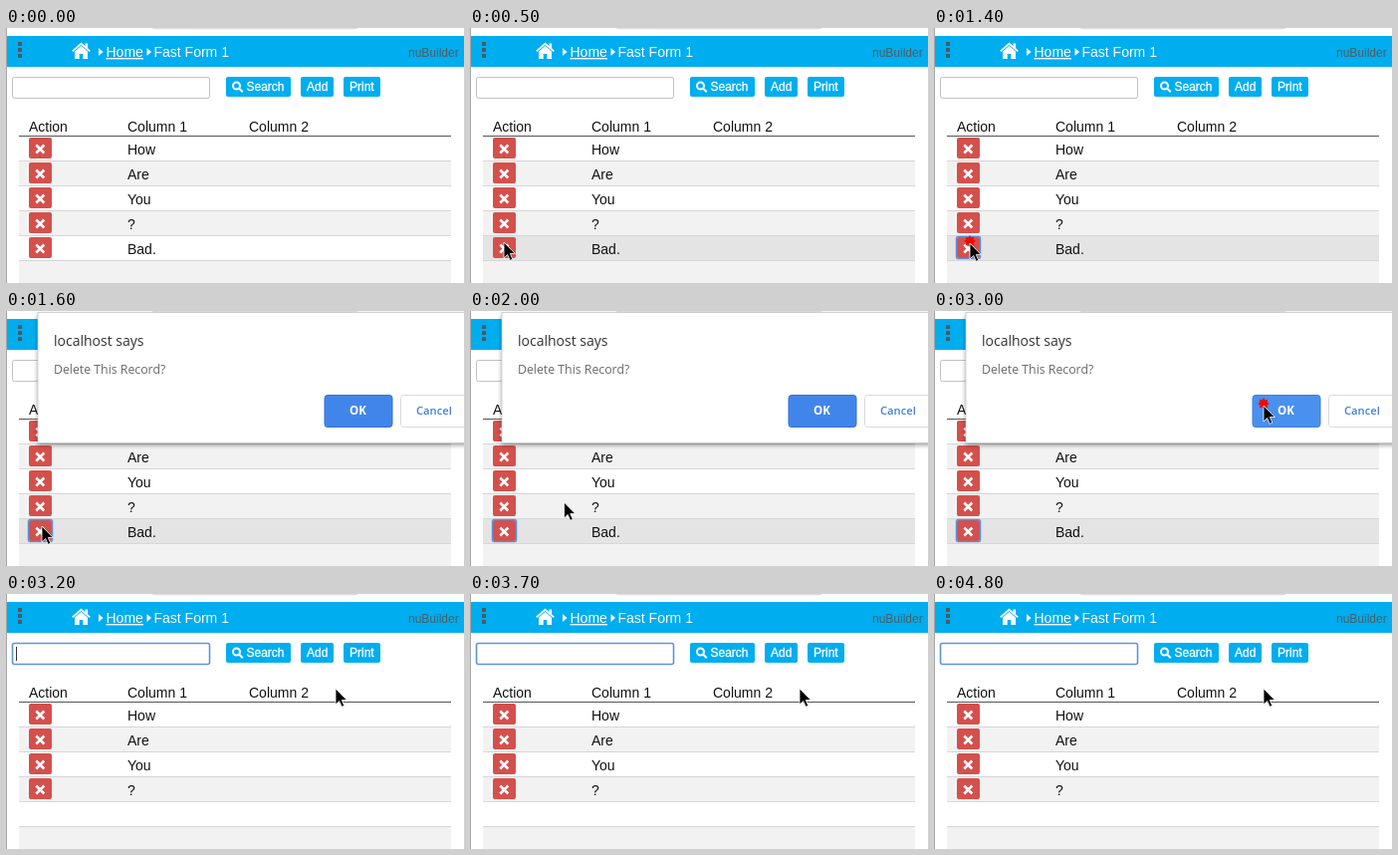
Animation of 460x256 px, one loop 5200 ms. Source, as an HTML page:

```html
<!DOCTYPE html>
<html lang="en">
<head>
<meta charset="utf-8">
<title>Deleting a record</title>
<style>
  html, body { margin: 0; width: 100%; height: 100%; overflow: hidden; background: #fff; }
  svg { display: block; width: 460px; height: 256px; }
  text { font: 14px "Liberation Sans", Arial, sans-serif; fill: #111; white-space: pre; }
  .white { fill: #fff; }
  .small { font-size: 12px; fill: #fff; stroke: #fff; stroke-width: .3px; }
  .brand { font-size: 12px; fill: #45606c; }
  .dialog text { font-family: "Open Sans", "Noto Sans", sans-serif; }
</style>
</head>
<body>
<svg viewBox="0 0 460 256">
  <defs>
    <filter id="shadow" x="-5%" y="-10%" width="110%" height="125%">
      <feDropShadow dx="0" dy="2" stdDeviation="2" flood-color="#000" flood-opacity=".38"/>
    </filter>
  </defs>
  <rect width="460" height="256" fill="#fff"/>
  <path d="M147 0Q149 .8 153 .8H347Q351 .8 353 0" fill="none" stroke="#d4d6d8"/>
  <rect width="1" height="256" fill="#a6a6a6"/>

  <rect x="1" y="8" width="459" height="31" fill="#00adef"/>
  <path d="M12 14h4v4h-4zM12 20h4v4h-4zM12 26h4v4h-4z" fill="#4a5a64"/>
  <g fill="#fff">
    <path d="M69 23.6 75.5 18 82 23.6V31H77.3V26H73.7V31H69Z"/>
    <path d="M66.7 23.4 75.5 15.8 84.3 23.4" fill="none" stroke="#fff" stroke-width="1.8"/>
    <path d="M79.5 15.5h2.6v5l-2.6-2.2z"/>
    <path d="M93 20l4.5 4-4.5 4zM141.500 20l4.500 4-4.500 4z"/>
  </g>
  <text class="white" x="100.500" y="29" text-decoration="underline">Home</text>
  <text class="white" x="148.500" y="29">Fast Form 1</text>
  <text class="brand" x="404" y="29">nuBuilder</text>

  <rect id="field" x="6.5" y="49.5" width="198" height="21" rx="2" fill="#fff"/>
  <path id="caret" d="M10.500 53V67" stroke="#333"/>
  <g fill="#00adef">
    <rect x="221" y="49" width="65" height="20" rx="2"/>
    <rect x="296" y="49" width="33" height="20" rx="2"/>
    <rect x="339" y="49" width="37" height="20" rx="2"/>
  </g>
  <g fill="none" stroke="#fff" stroke-width="2">
    <circle cx="231.500" cy="58" r="3.500"/><path d="M234 60.500 237.800 64.300"/>
  </g>
  <text class="small" x="241.500" y="63">Search</text>
  <text class="small" x="302" y="63">Add</text>
  <text class="small" x="345" y="63">Print</text>

  <text x="23" y="104">Action</text>
  <text x="122" y="104">Column 1</text>
  <text x="244" y="104">Column 2</text>
  <g id="rows"></g>
  <rect x="13" y="108" width="434" height="1" fill="#555"/>
  <rect id="focus" x="22.500" y="209.500" width="24" height="22" rx="2" fill="none" stroke="#5d8edb" stroke-width="1.500"/>

  <g id="dialog" class="dialog">
    <rect x="32" y="1.500" width="440" height="131" fill="#fff" stroke="#b4b4b4" stroke-width=".6" filter="url(#shadow)"/>
    <text x="48" y="35" style="font-size:14px;fill:#333">localhost says</text>
    <text x="48" y="62.500" style="font-size:12.300px;fill:#6a6a6a">Delete This Record?</text>
    <rect id="ok" x="320" y="84.500" width="68" height="32" rx="3"/>
    <text x="353.500" y="104" text-anchor="middle" style="font-size:11.500px;font-weight:700;fill:#fff">OK</text>
    <rect x="396.500" y="84.500" width="76" height="32" rx="3" fill="#fff" stroke="#d8dadd"/>
    <text x="412" y="104" style="font-size:11.200px;font-weight:600;fill:#3f7fdc">Cancel</text>
  </g>

  <path id="burst" fill="#f00808"/>
  <path id="pointer" d="M0 0V16L3.700 12.500 6.200 18.300 8.800 17.200 6.300 11.500H11.300Z" fill="#000" stroke="#fff" stroke-width=".8"/>
</svg>
<script>
const LOOP = 5200, STEP = 100;
const $ = id => document.getElementById(id);
const show = (el, on) => el.setAttribute("visibility", on ? "visible" : "hidden");
const set = (el, attrs) => { for (const k in attrs) el.setAttribute(k, attrs[k]); };

const words = ["How", "Are", "You", "?", "Bad."];
$("rows").innerHTML = [...words, ""].map((word, i) => {
  const y = 109 + 25 * i;
  const cells = word && `<g id="cells${i}">
    <rect x="23" y="${y + 1}" width="23" height="21" rx="2" fill="#d4504c"/>
    <path d="M30.300 ${y + 8.500}l8 8m0-8l-8 8" stroke="#fff" stroke-width="2.500"/>
    <text x="122" y="${y + 18}">${word}</text></g>`;
  return `<rect id="row${i}" x="13" y="${y}" width="434" height="25" fill="${i % 2 ? "#f2f2f2" : "#fff"}"/>
    <rect x="13" y="${y + 24}" width="434" height="1" fill="#d6d6d6"/>${cells}`;
}).join("");

// time, x, y of the pointer tip
const path = [
  [100, 72, 236], [500, 34, 215], [600, 34, 215], [900, 36, 216],
  [1800, 36, 216], [2500, 331, 95], [LOOP, 331, 95]
];

function pointerAt(t) {
  const i = Math.max(1, path.findIndex(p => p[0] >= t));
  const [t0, x0, y0] = path[i - 1], [t1, x1, y1] = path[i];
  const u = Math.max(0, (t - t0) / (t1 - t0));
  const e = u * u * (3 - 2 * u);
  return [x0 + (x1 - x0) * e, y0 + (y1 - y0) * e];
}

function star(cx, cy, r) {
  const points = Array.from({ length: 16 }, (_, i) => {
    const a = i * Math.PI / 8, d = i % 2 ? r * .65 : r;
    return `${cx + d * Math.cos(a)} ${cy + d * Math.sin(a)}`;
  });
  return `M${points.join("L")}Z`;
}

function draw(ms) {
  const t = Math.floor(ms % LOOP / STEP) * STEP;
  const within = (a, b) => t >= a && t < b;
  const [x, y] = pointerAt(t);
  const open = within(1500, 3100), reloaded = t >= 3200;

  show($("pointer"), t >= 100);
  set($("pointer"), { transform: `translate(${x} ${y})` });

  const hover = open || (t >= 100 && t < 3100 && y >= 209 && y < 234);
  set($("row4"), { fill: hover ? "#e4e4e4" : "#fff" });
  show($("cells4"), !reloaded);
  show($("focus"), within(1300, 3200));

  show($("dialog"), open);
  const overOk = x >= 320 && x <= 388 && y >= 84 && y <= 117;
  set($("ok"), { fill: overOk ? "#4a90ee" : "#4285ea", stroke: overOk ? "#3f7fdf" : "#3272d6" });

  const age = within(1300, 1500) ? t - 1300 : within(2900, 3100) ? t - 2900 : -1;
  show($("burst"), age >= 0);
  set($("burst"), { d: star(x, y - 2, age ? 6 : 4) });

  set($("field"), reloaded
    ? { stroke: "#5f93d8", "stroke-width": 1.6 }
    : { stroke: "#c2c2c2", "stroke-width": 1 });
  show($("caret"), within(3200, 3700) || within(4300, 4800));
}

const start = performance.now();
function frame() {
  draw(performance.now() - start);
  requestAnimationFrame(frame);
}
draw(0);
requestAnimationFrame(frame);
</script>
</body>
</html>
```
